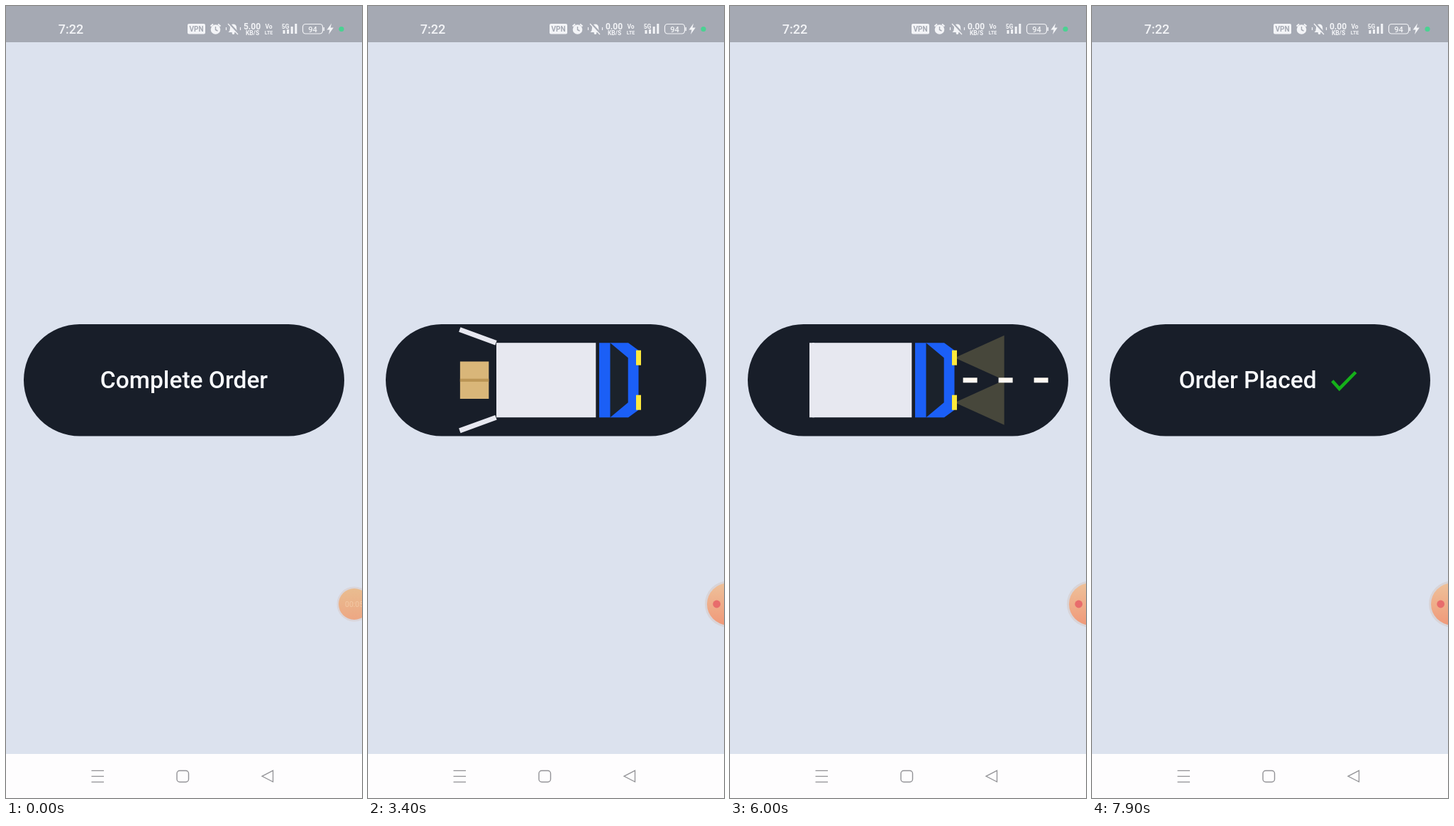
Recreate the animation shown at these times as an HTML page with a canvas. Size 502 by 1115 pixels, loop 8000 ms.

```html
<!DOCTYPE html>
<html lang="en">
<head>
<meta charset="utf-8">
<title>Order button</title>
<style>
  html, body { margin: 0; width: 100%; height: 100%; overflow: hidden; background: #dce2ee; }
  canvas { display: block; width: 502px; height: 1115px; }
</style>
</head>
<body>
<canvas id="stage" width="502" height="1115"></canvas>
<script>
const ctx = document.getElementById('stage').getContext('2d');
const LOOP = 8000;
const MID = 526.7;
const INK = '#181e29';
const PALE = '#e7e8f0';
const STATUS = '#a5a9b3';
const ICON = '#f3f4f7';

// Linear interpolation through [time, value] keys, held at both ends.
function track(keys, t) {
  if (t <= keys[0][0]) return keys[0][1];
  for (let i = 1; i < keys.length; i++) {
    const [t0, v0] = keys[i - 1], [t1, v1] = keys[i];
    if (t < t1) return v0 + (v1 - v0) * (t - t0) / (t1 - t0);
  }
  return keys[keys.length - 1][1];
}

const truckX = [[1500, 477], [2804, 177], [4200, 177], [4830, 242],
                [5435, 242], [6000, 112], [6576, 112], [7390, 482]];
const boxX = [[1500, -15.5], [2670, 60.5], [3200, 60.5], [3700, 233]];
const doorAngle = [[2800, 0], [3200, 110], [3700, 110], [4150, 0]];
const lightAlpha = [[4850, 0], [5400, 1]];
const roadAlpha = [[6950, 1], [7390, 0]];

function rect(x, y, w, h, color) {
  ctx.fillStyle = color;
  ctx.fillRect(x, y, w, h);
}

function roundRect(x, y, w, h, r) {
  ctx.beginPath();
  ctx.roundRect(x, y, w, h, r);
}

function poly(points, color) {
  ctx.beginPath();
  points.forEach(([x, y]) => ctx.lineTo(x, y));
  ctx.closePath();
  ctx.fillStyle = color;
  ctx.fill();
}

function stroke(points, color, width) {
  ctx.beginPath();
  points.forEach(([x, y]) => ctx.lineTo(x, y));
  ctx.strokeStyle = color;
  ctx.lineWidth = width;
  ctx.stroke();
}

function disc(x, y, r, color) {
  ctx.beginPath();
  ctx.arc(x, y, r, 0, Math.PI * 2);
  ctx.fillStyle = color;
  ctx.fill();
}

function label(text, x, y, size, weight, color, align = 'left') {
  ctx.font = `${weight} ${size}px Roboto, sans-serif`;
  ctx.textAlign = align;
  ctx.fillStyle = color;
  ctx.fillText(text, x, y);
}

function drawStatus(t) {
  rect(0, 0, 502, 51, STATUS);
  label('7:22', 91.5, 38.5, 18, 500, ICON, 'center');

  roundRect(256, 25, 25, 14.5, 2);
  ctx.fillStyle = ICON;
  ctx.fill();
  label('VPN', 268.5, 36, 10, 700, STATUS, 'center');

  disc(295.5, 33, 6.8, ICON);
  stroke([[288.5, 28.5], [292, 25.5]], ICON, 2);
  stroke([[299, 25.5], [302.5, 28.5]], ICON, 2);
  stroke([[295.5, 29], [295.5, 33.5], [298.5, 35]], STATUS, 1.4);

  ctx.beginPath();
  ctx.moveTo(313.5, 37);
  ctx.quadraticCurveTo(316, 35, 316, 31);
  ctx.arc(320.5, 30, 4.6, Math.PI, 0);
  ctx.quadraticCurveTo(325, 35, 327.5, 37);
  ctx.fillStyle = ICON;
  ctx.fill();
  disc(320.5, 38, 1.9, ICON);
  stroke([[314, 24], [328, 39]], STATUS, 3);
  stroke([[313, 25], [327, 40]], ICON, 1.3);
  for (const x of [310.5, 330.5]) stroke([[x, 30], [x, 34]], ICON, 1.2);

  label(t < 500 ? '5.00' : '0.00', 347, 33, 12, 700, ICON, 'center');
  label('KB/S', 347.5, 41, 8.5, 700, ICON, 'center');
  label('Vo', 370.5, 31.5, 8.5, 700, ICON, 'center');
  label('LTE', 370.5, 39.5, 7, 700, ICON, 'center');
  label('5G', 394, 31.5, 8.5, 700, ICON, 'center');
  [5, 6, 10, 14].forEach((h, i) => rect(390.5 + i * 5.6, 39 - h, 3, h, ICON));

  roundRect(418.5, 25.5, 28, 13.5, 4);
  ctx.strokeStyle = ICON;
  ctx.lineWidth = 1.2;
  ctx.stroke();
  rect(447.5, 30, 1.5, 5, ICON);
  label('94', 432.5, 36.5, 11, 500, ICON, 'center');
  poly([[459, 24.5], [452.5, 33.5], [456.5, 33.5], [455, 40], [461.8, 30.5], [457.6, 30.5]], ICON);
  disc(473, 32.5, 3.6, '#4ad292');
}

function drawNav() {
  const gray = '#929296';
  rect(0, 1053, 502, 62, '#fefdfe');
  for (const y of [1076.5, 1084.5, 1092.5]) stroke([[120.5, y], [138, y]], gray, 1.3);
  roundRect(241, 1076.5, 16.5, 16, 4);
  ctx.lineWidth = 1.4;
  ctx.stroke();
  stroke([[361, 1084.3], [376.5, 1076.3], [376.5, 1092.3], [361, 1084.3], [363, 1083.3]], gray, 1.3);
}

function drawRecorder(t) {
  if (t < 500) {
    disc(491, 842, 24.5, '#dad5da');
    const glow = ctx.createLinearGradient(0, 820, 0, 864);
    glow.addColorStop(0, '#e9bd90');
    glow.addColorStop(1, '#eda783');
    disc(491, 842, 22, glow);
    label('00:05', 478, 846, 10.5, 400, '#f3c9a5');
    return;
  }
  disc(507.5, 842, 32.5, '#d8d4d8');
  const glow = ctx.createLinearGradient(0, 814, 0, 870);
  glow.addColorStop(0, '#eec099');
  glow.addColorStop(1, '#f09a7a');
  disc(507.5, 842, 29.5, glow);
  disc(491.7, 842, 5.4, '#e86c6c');
}

function drawParcel(x) {
  rect(x, 500.5, 40.5, 52.5, '#d9b679');
  rect(x, 524.7, 40.5, 4.2, '#bb9555');
}

function drawRoad(t) {
  const lead = 229 - 0.365 * (t - 6000);
  if (lead > 477) return;
  ctx.globalAlpha = track(roadAlpha, t);
  let x = lead;
  while (x < -30) x += 50;
  for (; x < 477; x += 50) rect(x, 523.3, 20, 7, '#fffaf3');
  ctx.globalAlpha = 1;
}

function drawLights(x, alpha) {
  ctx.globalAlpha = alpha;
  for (const y of [495.3, 558.2]) {
    poly([[x + 205, y], [x + 274.7, y - 31.5], [x + 274.7, y + 31.5]], '#47473b');
  }
  ctx.globalAlpha = 1;
}

function drawDoor(x, angle, side) {
  ctx.save();
  ctx.translate(x + 3.5, MID);
  ctx.scale(1, side);
  ctx.translate(0, -52.5);
  ctx.rotate(angle * Math.PI / 180);
  rect(-3.5, 0, 7, 54.5, PALE);
  ctx.restore();
}

function drawTruck(x, angle) {
  drawDoor(x, angle, 1);
  drawDoor(x, angle, -1);
  rect(x + 4, 474.2, 140.3, 105, PALE);
  poly([[x + 149, 474.2], [x + 190, 474.2], [x + 204.5, 484.7],
        [x + 204.5, 568.7], [x + 190, 579.2], [x + 149, 579.2]], '#1b5ff6');
  poly([[x + 164.5, 474.2], [x + 189.7, 495.2], [x + 189.7, 558.2], [x + 164.5, 579.2]], '#1b222b');
  for (const y of [484.7, 547.7]) rect(x + 201, y, 7, 21, '#fde93c');
}

function drawButton(t) {
  ctx.save();
  roundRect(25, 448, 452, 157.5, 78.75);
  ctx.fillStyle = INK;
  ctx.fill();
  ctx.clip();
  if (t < 950) {
    label('Complete Order', 251, 538, 33.5, 500, '#f8fafd', 'center');
  } else if (t >= 7850) {
    label('Order Placed', 219.5, 538, 33.5, 500, '#f8fafd', 'center');
    stroke([[338.8, 527.8], [348.8, 538.8], [371.8, 515.5]], '#15b01a', 4.6);
  } else if (t >= 1500 && t < 7390) {
    const x = track(truckX, t);
    if (t < 3800) drawParcel(track(boxX, t));
    drawLights(x, track(lightAlpha, t));
    drawRoad(t);
    drawTruck(x, track(doorAngle, t));
  }
  ctx.restore();
}

function render(now) {
  const t = now % LOOP;
  rect(0, 0, 502, 1115, '#dce2ee');
  drawStatus(t);
  drawNav();
  drawRecorder(t);
  drawButton(t);
}

const start = performance.now();
function tick() {
  render(performance.now() - start);
  requestAnimationFrame(tick);
}
tick();
</script>
</body>
</html>
```
